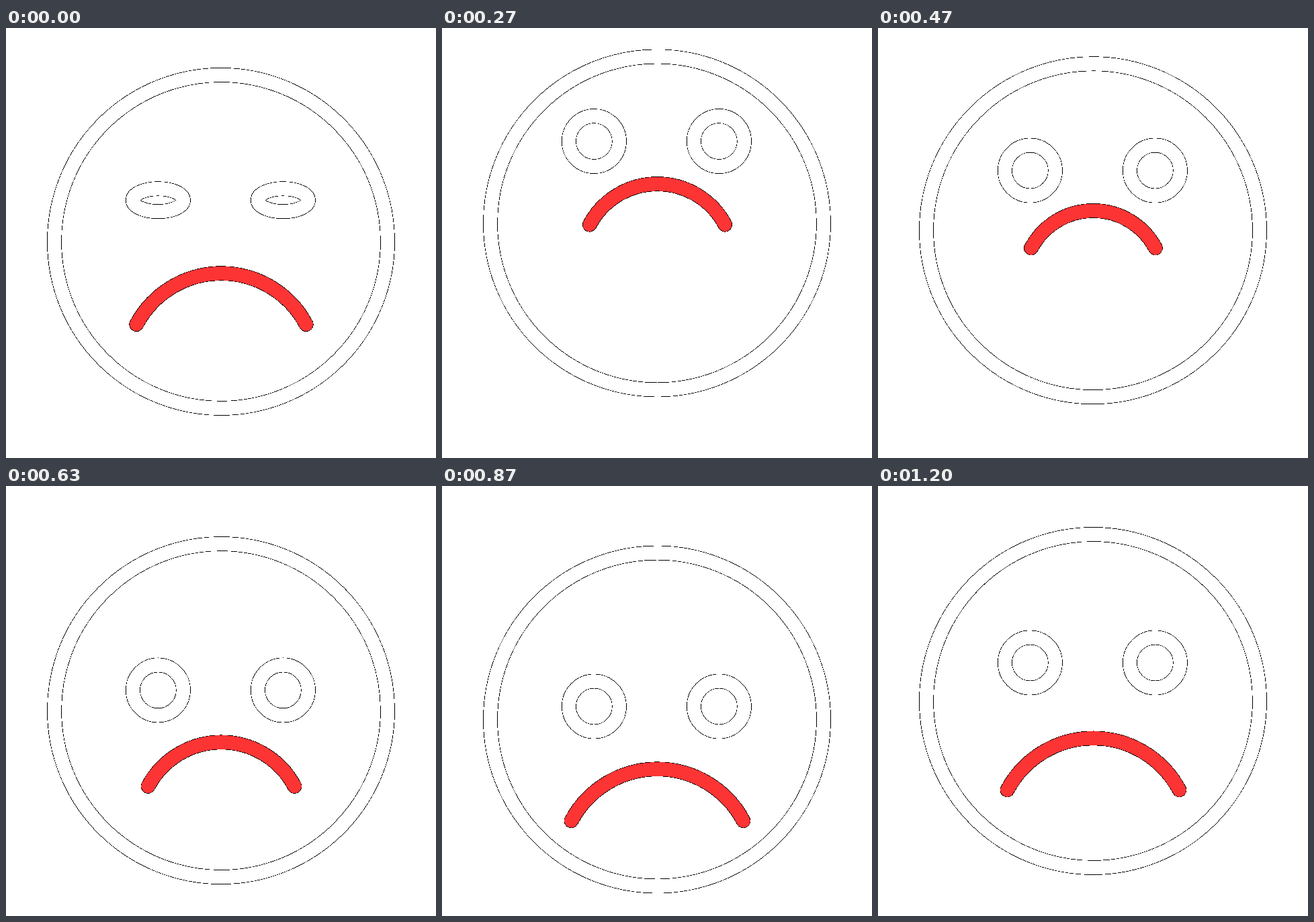
An HTML page that plays this animation: 640 px wide and 640 px high, repeating every 1670 ms.

```html
<!DOCTYPE html>
<html lang="en">
<head>
<meta charset="utf-8">
<title>Sad face</title>
<style>
  html, body { margin: 0; width: 100%; height: 100%; overflow: hidden; background: #fff; }
  svg { display: block; width: 100%; height: 100%; shape-rendering: crispEdges; }
  svg * { fill: none; stroke-linecap: round; }
</style>
</head>
<body>
<svg viewBox="0 0 640 640"></svg>
<script>
const LOOP = 1670, STEP = 100 / 3, LAST = 36;
const svg = document.querySelector('svg');

// Keys are [step, value] pairs, eased between neighbours.
const faceY  = [[-1.2, 320], [10.5, 284.5], [23, 354], [35.8, 320]];
const eyeY   = [[-1.2, 263], [9.93, 155], [22.34, 348], [35.65, 263]];
const eyeRy  = [[-1.2, 37.5], [1, 0.5], [3.5, 37.5]];
const mouthY = [[-1.2, 375.2], [10.15, 208.2], [22.4, 435.2], [35.5, 375.2]];
const mouthS = [[-1.2, 1], [12.4, 0.7], [25.5, 1]];

// cubic-bezier(1/6, 0, 5/6, 1), solved by bisection
function ease(x) {
  let lo = 0, hi = 1;
  for (let i = 0; i < 24; i++) {
    const t = (lo + hi) / 2;
    if (t * (0.5 + t * (1.5 - t)) < x) lo = t; else hi = t;
  }
  return lo * lo * (3 - 2 * lo);
}

function valueAt(keys, n) {
  for (let i = 1; i < keys.length; i++) {
    const [a, from] = keys[i - 1], [b, to] = keys[i];
    if (n < b) return from + (to - from) * ease((n - a) / (b - a));
  }
  return keys[keys.length - 1][1];
}

// A thick stroke with a hairline edge on both sides
function outlined(tag, color) {
  const layers = [['#000', 21.85], [color, 20.4]].map(([stroke, width]) => {
    const el = document.createElementNS('http://www.w3.org/2000/svg', tag);
    el.setAttribute('stroke', stroke);
    el.setAttribute('stroke-width', width);
    return svg.appendChild(el);
  });
  return attrs => {
    for (const el of layers)
      for (const key in attrs) el.setAttribute(key, attrs[key]);
  };
}

const face = outlined('ellipse', '#fff');
const eyes = [226.4, 412.4].map(cx => [cx, outlined('ellipse', '#fff')]);
const mouth = outlined('path', '#fd3434');

function draw(time) {
  const tick = Math.floor(time / 10) * 10;
  const n = Math.min(LAST, Math.floor((tick + 3.34) / STEP));

  face({ cx: 320, cy: valueAt(faceY, n), rx: 248, ry: 248 });

  const cy = valueAt(eyeY, n), ry = valueAt(eyeRy, n);
  for (const [cx, eye] of eyes) eye({ cx, cy, rx: 37.5, ry });

  const s = valueAt(mouthS, n), r = 144.9 * s, half = 128 * s;
  const end = valueAt(mouthY, n) + 77.2 * s;
  mouth({ d: `M${320.5 - half} ${end}A${r} ${r} 0 0 1 ${320.5 + half} ${end}` });
}

const start = performance.now();
function loop() {
  draw((performance.now() - start) % LOOP);
  requestAnimationFrame(loop);
}
loop();
</script>
</body>
</html>
```
